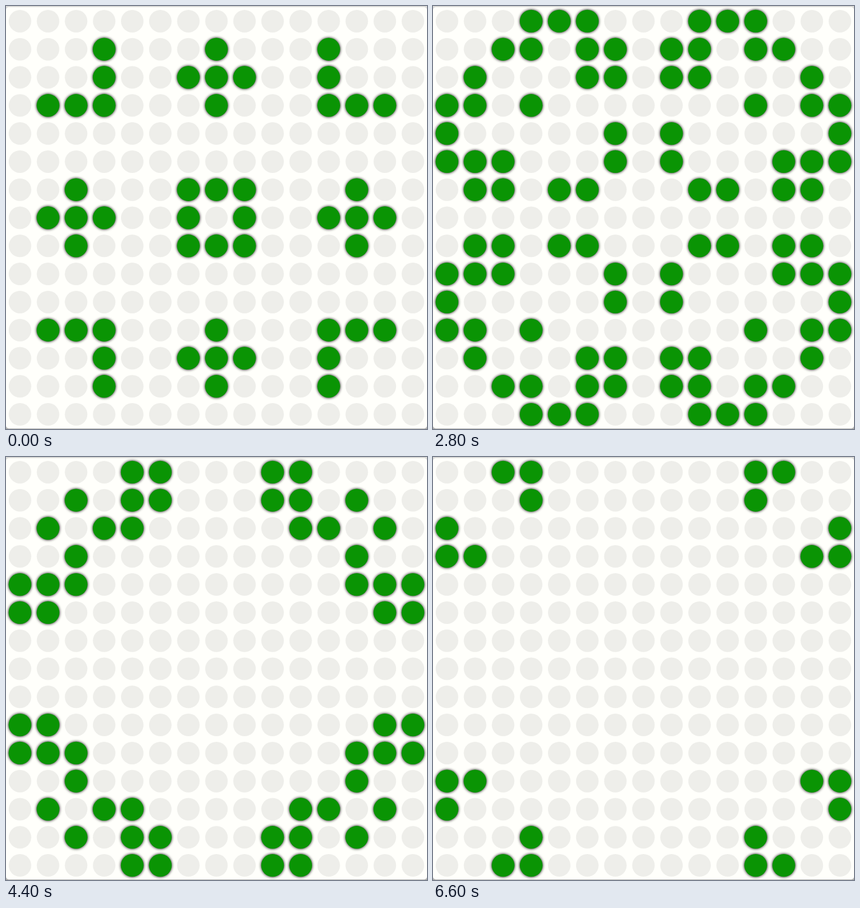
An HTML page with a canvas that plays this animation: 747 by 750 pixels, repeating every 6800 ms.

```html
<!DOCTYPE html>
<html lang="en">
<head>
<meta charset="utf-8">
<title>Game of Life</title>
<style>
  html, body { margin: 0; width: 100%; height: 100%; overflow: hidden; background: #fffffb; }
  canvas { display: block; }
</style>
</head>
<body>
<canvas id="board" width="747" height="750"></canvas>
<script>
const SIZE = 15, PITCH = 49.8, LEFT = 24.8, TOP = 26.9, RADIUS = 20;
const LOOP = 6800;
// start time of every generation, in ms
const STARTS = [0, 1700, 2000, 2200, 2400, 2600, 2800, 3100, 3200, 3400, 3600, 3800, 4000,
  4200, 4400, 4600, 4900, 5000, 5200, 5400, 5600, 5800, 6000, 6200, 6400, 6600];

// top-left part of the seed; the rest is mirrored
const SEED = [
  '........',
  '...#...#',
  '...#..##',
  '.###...#',
  '........',
  '........',
  '..#...##',
  '.###..#.'
];

const range = [...Array(SIZE).keys()];
const fold = i => Math.min(i, SIZE - 1 - i);
const makeGrid = rule => range.map(r => range.map(c => rule(r, c)));

function step(grid) {
  const alive = (r, c) => grid[r]?.[c] ? 1 : 0;
  return makeGrid((r, c) => {
    let n = -alive(r, c);
    for (let dr = -1; dr <= 1; dr++)
      for (let dc = -1; dc <= 1; dc++) n += alive(r + dr, c + dc);
    return n === 3 || (n === 2 && grid[r][c]);
  });
}

const generations = [makeGrid((r, c) => SEED[fold(r)][fold(c)] === '#')];
while (generations.length < STARTS.length) generations.push(step(generations.at(-1)));

const canvas = document.getElementById('board');
const ctx = canvas.getContext('2d');

function disc(r, c, radius, color) {
  ctx.fillStyle = color;
  ctx.beginPath();
  ctx.arc(LEFT + c * PITCH, TOP + r * PITCH, radius, 0, Math.PI * 2);
  ctx.fill();
}

function drawPanel() {
  ctx.fillStyle = '#dcdcd9';
  ctx.fillRect(0, 0, 747, 375);
  ctx.fillStyle = '#b0b0ae';
  ctx.fillRect(0, 375, 747, 375);
  ctx.fillStyle = '#fffffb';
  ctx.beginPath();
  ctx.roundRect(0, 2, 747, 747, 5);
  ctx.fill();
}

function draw(grid) {
  drawPanel();
  for (const r of range) for (const c of range) {
    if (!grid[r][c]) disc(r, c, RADIUS, '#eeeeea');
  }
  ctx.save();
  ctx.shadowColor = '#000';
  ctx.shadowBlur = 5;
  for (const r of range) for (const c of range) {
    if (grid[r][c]) disc(r, c, RADIUS + 0.2, '#0a9404');
  }
  ctx.restore();
}

let shown = -1;
const origin = performance.now();
function tick() {
  const t = (performance.now() - origin) % LOOP;
  const index = STARTS.findLastIndex(s => s <= t);
  if (index !== shown) draw(generations[shown = index]);
  requestAnimationFrame(tick);
}
tick();
</script>
</body>
</html>
```
